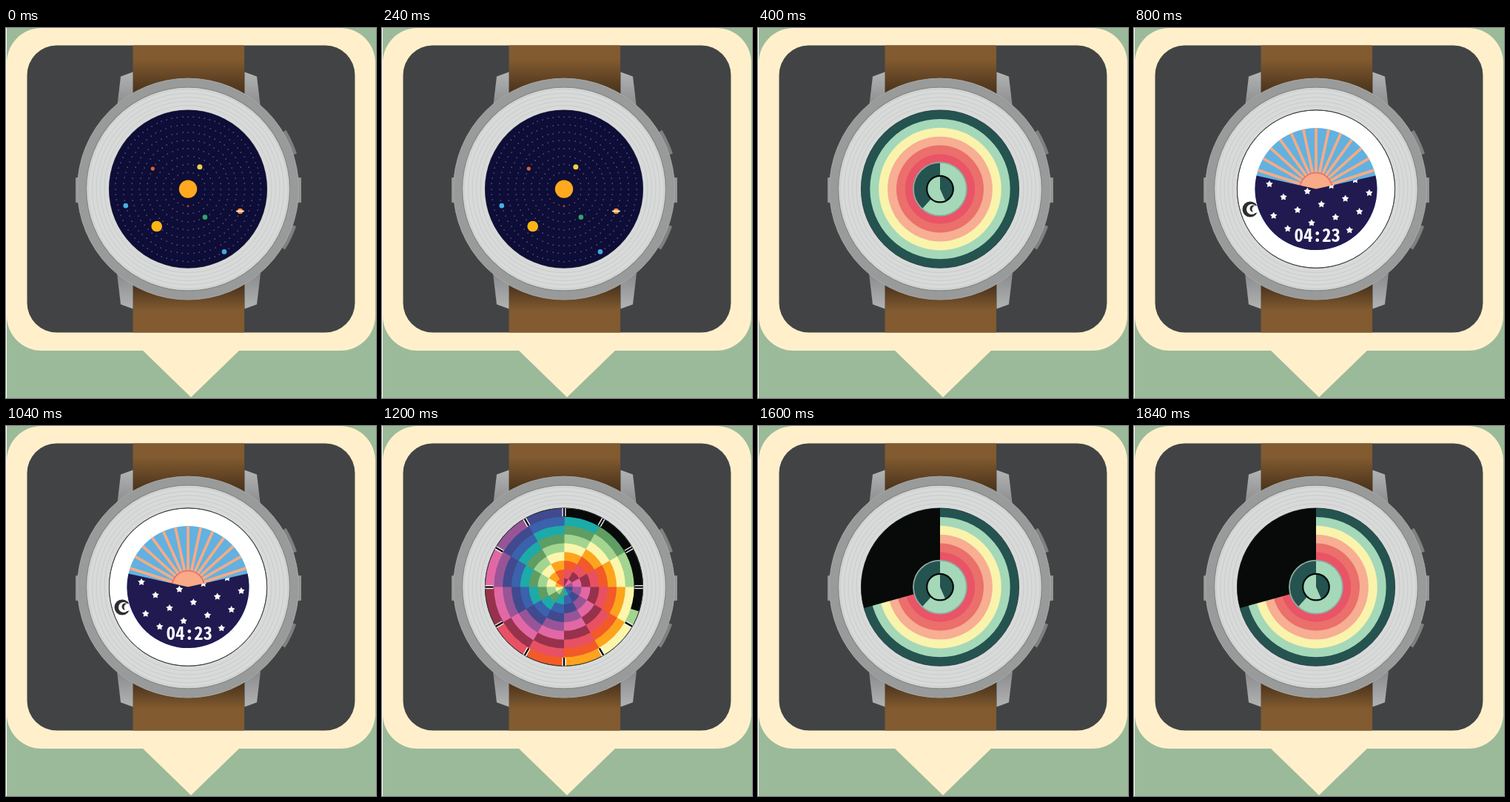
An HTML page with a canvas that plays this animation: 500x500 px, repeating every 2000 ms.

```html
<!DOCTYPE html>
<html lang="en">
<head>
<meta charset="utf-8">
<title>Watch faces</title>
<style>
  html, body { margin: 0; width: 100%; height: 100%; overflow: hidden; background: #9bba9a; }
  canvas { display: block; width: 500px; height: 500px; }
</style>
</head>
<body>
<canvas id="stage" width="500" height="500"></canvas>
<script>
const ctx = document.getElementById('stage').getContext('2d');
const CX = 246, CY = 217.6, SCREEN = 106.6, TAU = Math.PI * 2;
const HOLD = 400;
const INK = '#070a09', TEAL = '#245350', MINT = '#a4d8b9';

// Clock angles: degrees clockwise from twelve.
const rad = deg => (deg - 90) * Math.PI / 180;
const polar = (deg, r, x = CX, y = CY) => [x + r * Math.cos(rad(deg)), y + r * Math.sin(rad(deg))];

function disc(x, y, r, fill, stroke, width = 1) {
  ctx.beginPath();
  ctx.arc(x, y, r, 0, TAU);
  if (fill) { ctx.fillStyle = fill; ctx.fill(); }
  if (stroke) { ctx.strokeStyle = stroke; ctx.lineWidth = width; ctx.stroke(); }
}

const dial = (r, fill, stroke, width) => disc(CX, CY, r, fill, stroke, width);

function poly(points, fill) {
  ctx.beginPath();
  points.forEach(point => ctx.lineTo(...point));
  ctx.closePath();
  ctx.fillStyle = fill;
  ctx.fill();
}

function sector(from, to, outer, fill, inner = 0) {
  ctx.beginPath();
  ctx.arc(CX, CY, outer, rad(from), rad(to));
  ctx.arc(CX, CY, inner, rad(to), rad(from), true);
  ctx.closePath();
  ctx.fillStyle = fill;
  ctx.fill();
}

function line(from, to, color, width) {
  ctx.beginPath();
  ctx.moveTo(...from);
  ctx.lineTo(...to);
  ctx.strokeStyle = color;
  ctx.lineWidth = width;
  ctx.stroke();
}

function rect(x, y, w, h, fill, radius = 0) {
  ctx.beginPath();
  ctx.roundRect(x, y, w, h, radius);
  ctx.fillStyle = fill;
  ctx.fill();
}

function fade(y0, y1, ...colors) {
  const g = ctx.createLinearGradient(0, y0, 0, y1);
  colors.forEach((color, i) => g.addColorStop(i / (colors.length - 1), color));
  return g;
}

function drawFrame() {
  rect(0, 0, 500, 500, '#9bba9a');
  rect(0, 0, 1, 500, '#fff');
  rect(1, 0, 498, 436, '#fff0cb', 47);
  poly([[184, 435], [250, 499], [316, 435]], '#fff0cb');
  rect(28.5, 23.5, 443, 388, '#424344', 40);
}

function drawLug(flipX, flipY) {
  ctx.save();
  ctx.translate(247, 219.5);
  ctx.scale(flipX, flipY);
  poly([[-75.5, -160], [-92, -154], [-97, -112], [-75.5, -120]], fade(-160, -115, '#b2b4b4', '#8b8d8e'));
  ctx.restore();
}

function drawWatch() {
  const leather = '#825b30', shade = '#4d351d';
  rect(171.5, 23.5, 150.5, 66, fade(42, 84, leather, shade));
  rect(171.5, 345, 150.5, 66.5, fade(350, 382, shade, leather));
  for (const x of [-1, 1]) for (const y of [-1, 1]) drawLug(x, y);

  rect(94, 202, 305, 34, '#949696', 1);
  sector(59, 72, 154.5, '#7f8181');
  sector(109, 122, 154.5, '#7f8181');

  dial(149.5, '#999b9b', '#a8a9a9');
  dial(137.5, '#d8dada', '#8b8d8d', 1.5);
  for (let r = 113; r < 136; r += 5.5) dial(r, null, '#cacccc');
  dial(SCREEN + 0.5, '#3a3c3d');
}

function solarSystem() {
  const planets = [
    { angle: 180, size: 1.6, color: '#9c3630' },
    { angle: 28, size: 3.5, color: '#f1cf45' },
    { angle: 149, size: 3.3, color: '#2fa56b' },
    { angle: 300, size: 2.6, color: '#dc6330' },
    { angle: 220, size: 7.3, color: '#fdb515' },
    { angle: 113, size: 3.8, color: '#ef9436', ringed: true },
    { angle: 255, size: 3.3, color: '#46b2e3' },
    { angle: 150, size: 3.3, color: '#46a6df' }
  ];
  dial(SCREEN, '#0d0d38');
  dial(12.2, '#ffa91e');
  planets.forEach(({ angle, size, color, ringed }, i) => {
    const orbit = 23 + i * 10.7;
    const count = 4 * Math.round(orbit * TAU / 30);
    for (let k = 0; k < count; k++) {
      const [x, y] = polar(k * 360 / count, orbit);
      rect(Math.round(x) - 0.5, Math.round(y) - 0.5, 1.3, 1.3, '#74748f');
    }
    const [x, y] = polar(angle, orbit);
    disc(x, y, size, color);
    if (ringed) line([x - 5.5, y], [x + 5.5, y], '#fff', 1.5);
  });
}

function rings(wedge) {
  const colors = [TEAL, MINT, '#faf3ac', '#f7ae92', '#eb6f6b', '#e95466'];
  colors.forEach((color, i) => dial(SCREEN - i * 11.9, color));
  if (wedge) sector(254.5, 360, SCREEN, INK);
  dial(36, MINT);
  sector(222, 360, 36, TEAL);
  dial(36, null, '#8faaa0', 1.8);
  dial(18, MINT);
  sector(0, 156, 18, TEAL);
  dial(17.8, null, INK, 2.2);
}

function star(x, y) {
  const corner = (_, i) => polar(i * 36, i % 2 ? 2.7 : 5, x, y);
  poly(Array.from({ length: 10 }, corner), '#fff');
}

function moon(x, y) {
  disc(x, y, 10.5, '#2e2e30');
  disc(x + 2, y, 7, '#fff');
  disc(x + 4, y - 1, 4.5, '#2e2e30');
  disc(x + 7.5, y, 5, '#fff');
}

function sunrise() {
  const radius = 82.5, dusk = 77.3;
  dial(SCREEN, '#fff', '#303233');
  moon(157, 245);
  dial(radius, '#62b1e0');
  for (let a = -72; a <= 72; a += 12) line([CX, CY], polar(a, radius), '#f5ab85', 3.8);
  dial(22, '#f9aa87', '#ee6560', 1.5);
  sector(dusk, 360 - dusk, radius, '#201a50');

  // A slanted lattice of stars, cut by the horizon and kept clear of the time.
  ctx.save();
  ctx.clip();
  for (let row = -2; row <= 2; row++) {
    for (let col = -2; col <= 4; col++) {
      const x = 221 + 32.3 * col + 19 * row, y = 246 - 7.7 * col + 17.5 * row;
      if (Math.hypot(x - CX, y - CY) < 74 && y < 277) star(x, y);
    }
  }
  ctx.restore();

  ctx.font = 'bold 25px "Noto Sans Mono CJK JP", "Noto Sans Mono", monospace';
  ctx.textAlign = 'center';
  ctx.fillStyle = '#fff';
  ctx.fillText('04:23', 247.7, 289);
}

function colorWheel() {
  const colors = [
    '#3a62ad', '#1caba8', '#5f9d63', '#a3d590', '#fbf6ac', '#fda41c',
    '#f25a29', '#e85163', '#97324c', '#e268a5', '#975597', '#41498f'
  ];
  const step = SCREEN / 9;
  for (let ring = 0; ring < 9; ring++) {
    for (let hour = 0; hour < 12; hour++) {
      sector(hour * 30, hour * 30 + 30.4, SCREEN - ring * step, colors[(hour + ring) % 12]);
    }
  }
  sector(0, 108, SCREEN, INK, SCREEN - step);
  dial(SCREEN, null, '#303233');
  for (let a = 0; a < 360; a += 30) {
    line(polar(a, 95.5), polar(a, SCREEN), '#fff', 5);
    line(polar(a, 95.5), polar(a, SCREEN), INK, 2.4);
  }
}

const faces = [solarSystem, () => rings(false), sunrise, colorWheel, () => rings(true)];

function render() {
  const index = Math.floor(performance.now() / HOLD) % faces.length;
  drawFrame();
  drawWatch();
  faces[index]();
  requestAnimationFrame(render);
}
render();
</script>
</body>
</html>
```
